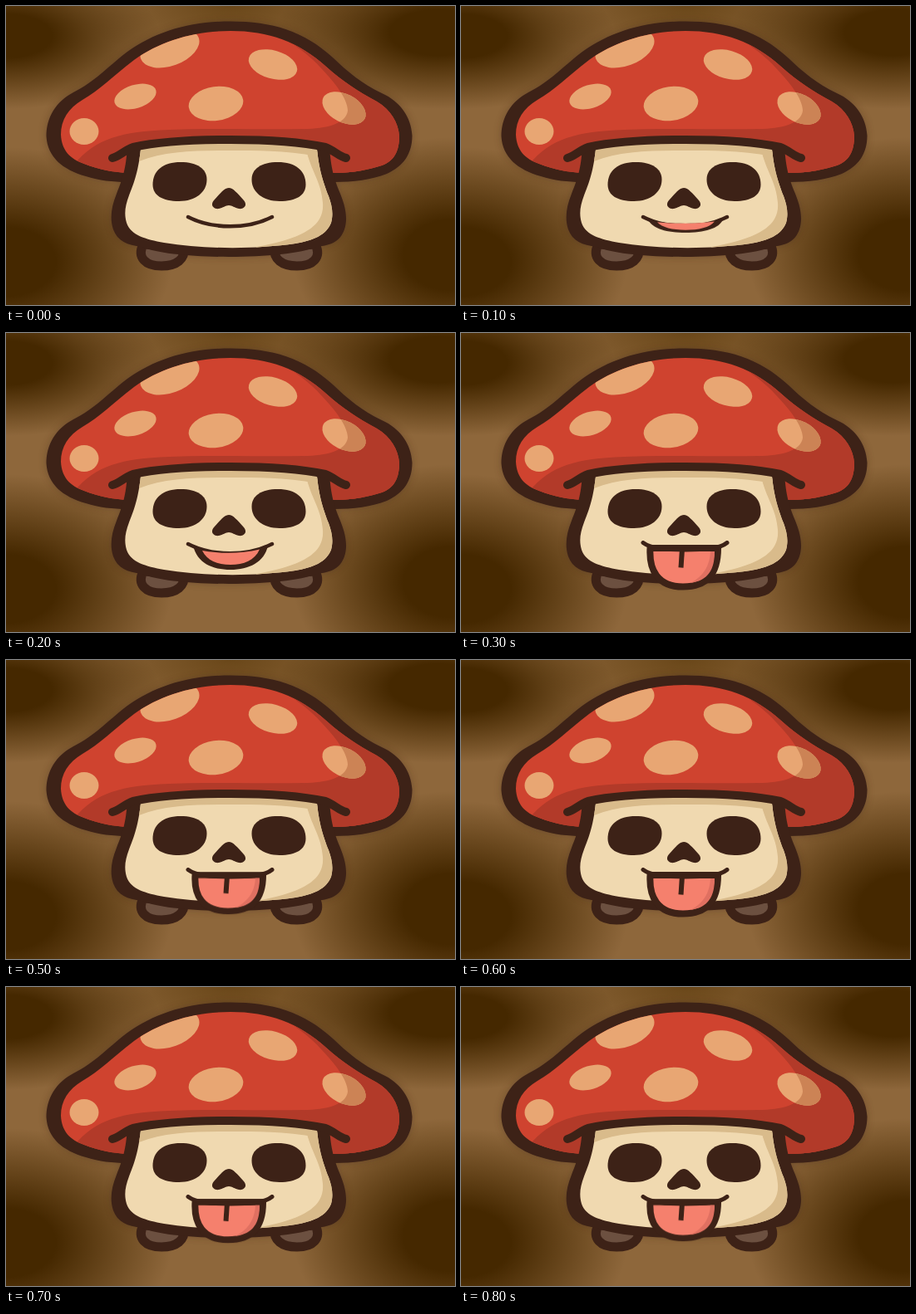
These frames come from a looping animation (540x360 px, 900 ms). An HTML page:

```html
<!DOCTYPE html>
<html lang="en">
<head>
<meta charset="utf-8">
<title>Mushroom</title>
<style>
  html, body { margin: 0; width: 100%; height: 100%; overflow: hidden; }
  body {
    background:
      radial-gradient(ellipse 185px 88px at 0 36px, #452800 30%, #45280000),
      radial-gradient(ellipse 195px 92px at 520px 32px, #452800 30%, #45280000),
      radial-gradient(ellipse 200px 138px at 0 308px, #452800 30%, #45280000),
      radial-gradient(ellipse 190px 142px at 535px 300px, #452800 30%, #45280000),
      radial-gradient(ellipse 190px 70px at 270px 0, #6a4719, #6a471900),
      #8e673b;
  }
  svg { display: block; width: 100%; height: 100%; }
  .ink { fill: #3d2217; }
  .line { fill: none; stroke: #3d2217; stroke-linecap: round; stroke-linejoin: round; }
  .spot { fill: #e8a673; }
  .pink { fill: #f5806d; }

  .pose { animation: 900ms step-end infinite; transform-origin: 270px 258px; }
  #smile { animation-name: smile; }
  #open { animation-name: open; }
  #lick { animation-name: lick; }
  #tongue { animation-name: wag; animation-duration: 300ms; }
  @keyframes smile {
    0% { visibility: visible; }
    33.333%, 100% { visibility: hidden; }
  }
  @keyframes open {
    0% { visibility: hidden; }
    11.111% { visibility: visible; transform: scaleY(.55); }
    22.222% { visibility: visible; transform: none; }
    33.333%, 100% { visibility: hidden; }
  }
  @keyframes lick {
    0% { visibility: hidden; }
    33.333%, 100% { visibility: visible; }
  }
  @keyframes wag {
    0% { transform: none; }
    33.333% { transform: scaleY(.975); }
    66.667%, 100% { transform: scaleY(.935); }
  }
</style>
</head>
<body>
<svg viewBox="0 0 540 360">
  <defs>
    <path id="capEdge" d="M270 18.500C220 18.500 180 31 146 55C119 76 107 91 81 104C60 115 48.500 134 48.500 157C50 182 68 197 96 205C112 210 128 212 146 212H394C418 212 440 209 458 202C478 193 488.500 178 488.500 156C487 133 474 115 452 105C427 93 412 80 393 62C358 30 320 18.500 270 18.500Z"/>
    <path id="cap" d="M270 30C226 30 186 42 154 65C128 85 113 101 92 113C75 123 66 137 66 155C67 174 77 184 94 190C112 197 128 200 146 201H396C416 201 437 197 452 192C467 187 473 174 473 157C472 141 463 125 446 115C424 103 405 91 385 73C352 43 316 30 270 30Z"/>
    <path id="stemEdge" d="M146 170C144 196 141 206 133 226C126 243 125 257 129 269C134 283 146 288 163 290C200 306 336 306 374 290C392 288 402 283 407 269C411 257 409 243 402 226C394 206 391 196 389 170Z"/>
    <path id="stem" d="M163 163C160 195 156 208 148 228C143 241 142 251 145 261C150 276 168 281 190 285C240 293 300 293 348 286C370 282 385 276 391 261C394 250 392 240 388 229C380 208 376 195 373 163Z"/>
    <path id="side" d="M325 32C352 50 368 62 380 76C396 93 411 112 411 126C409 142 385 148 358 148L400 215H500V30Z"/>
    <ellipse id="sideSpot" cx="406.500" cy="123" rx="28" ry="17" transform="rotate(27 406.500 123)"/>
    <clipPath id="inCap"><use href="#cap"/></clipPath>
    <clipPath id="inStem"><use href="#stem"/></clipPath>
    <clipPath id="inSide"><use href="#side"/></clipPath>
    <filter id="blur" x="-10%" y="-10%" width="120%" height="120%"><feGaussianBlur stdDeviation="5"/></filter>
  </defs>

  <g class="ink" filter="url(#blur)" opacity=".35">
    <use href="#capEdge"/>
    <use href="#stemEdge"/>
  </g>

  <g class="line" stroke-width="11" style="fill:#6c5040">
    <path id="foot" d="M165 287C157 303 168 313 187 313C205 313 216 305 214 290Z"/>
    <use href="#foot" transform="matrix(-1 0 0 1 537 0)"/>
  </g>

  <use href="#capEdge" class="ink"/>
  <use href="#cap" fill="#cf432f"/>
  <g clip-path="url(#inCap)">
    <g fill="#b23a29">
      <path d="M76 198C104 161 132 153 185 149.500C245 146.500 305 149 358 148L440 215H70Z"/>
      <use href="#side"/>
    </g>
    <g class="spot">
      <ellipse cx="197" cy="51" rx="37" ry="21" transform="rotate(-20 197 51)"/>
      <ellipse cx="321" cy="70.500" rx="30" ry="17" transform="rotate(16 321 70.500)"/>
      <ellipse cx="155.500" cy="109" rx="26" ry="14" transform="rotate(-17 155.500 109)"/>
      <ellipse cx="252.500" cy="117.500" rx="33" ry="20.500" transform="rotate(-8 252.500 117.500)"/>
      <ellipse cx="94" cy="151" rx="17.500" ry="16"/>
      <use href="#sideSpot"/>
    </g>
    <g clip-path="url(#inSide)"><use href="#sideSpot" fill="#cc8355"/></g>
  </g>

  <use href="#stemEdge" class="ink"/>
  <use href="#stem" fill="#f0d9b0"/>
  <g clip-path="url(#inStem)" fill="#d9bb8b">
    <path d="M150 160H390V184C340 173 300 174 265 174C225 174 190 175 160 187Z"/>
    <path d="M361 172C366 198 379 210 381 237C383 263 362 279 301 290V300H410V165Z"/>
  </g>
  <path class="line" stroke-width="10" d="M128 183C136 181 142 174 153 170C185 163 225 161 270 161C315 161 352 163 384 170C395 174 400 181 409 183"/>

  <g class="ink">
    <path id="eye" d="M176.500 215C176.500 198 189 188 210 188C230 188 241.500 196 241.500 209C241.500 224 228 235 208 235C188 235 176.500 228 176.500 215Z"/>
    <use href="#eye" transform="matrix(-1 0 0 1 537 0)"/>
    <path d="M268 219C273 219 278 225 286 234C291 240 286 245 280 244C275 243 272 240 268 240C264 240 261 243 256 244C250 245 245 240 250 234C258 225 263 219 268 219Z"/>
  </g>

  <path id="smile" class="line pose" stroke-width="4.500" d="M219 254C248 269 291 269 320 254"/>

  <g id="open" class="pose">
    <path class="ink" d="M225 256C250 268 290 268 315 256C311 276 292 285 270 285C248 285 230 277 225 256Z"/>
    <path class="pink" d="M236 262C258 266 282 266 305 260.500C299 274 286 279 270 279C254 279 242 274 236 262Z"/>
  </g>

  <g id="lick" class="pose">
    <g id="tongue" class="pose">
      <path class="line" stroke-width="8" style="fill:#f5806d" d="M227.500 259C226 285 236 305.500 267 305.500C300 305.500 309 284 309 259Z"/>
      <path d="M305 263C305 284 298 298 276 301C293 292 299 279 300 263Z" fill="#e07061"/>
      <path class="line" stroke-width="6" style="stroke-linecap:butt" d="M266 260L264.500 282.500"/>
    </g>
    <path class="line" stroke-width="5" d="M219 252.500C229 260 247 261 270 261C292 261 311 260 320 252.500"/>
  </g>
</svg>
</body>
</html>
```
